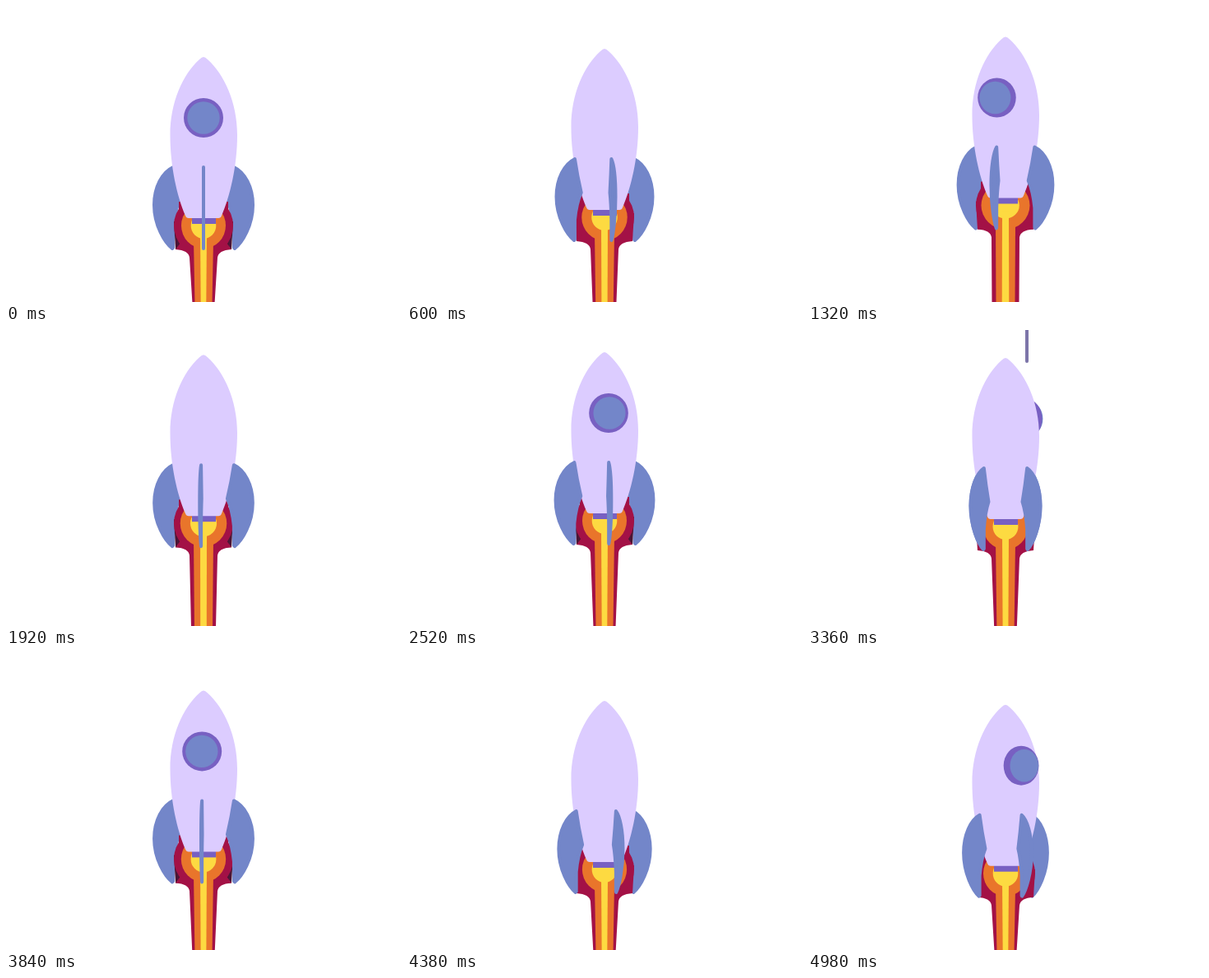
An HTML page with a canvas for the animation above (5.04 s loop, 480x360 px).

```html
<!DOCTYPE html>
<html lang="en">
<head>
<meta charset="utf-8">
<title>Rocket</title>
<style>
  html, body { margin: 0; width: 100%; height: 100%; overflow: hidden; background: #fff; }
  canvas { display: block; }
</style>
</head>
<body>
<canvas id="stage" width="480" height="360"></canvas>
<script>
const ctx = document.getElementById('stage').getContext('2d');
const LOOP = 5040, STEP = 60, CX = 240;
const LILAC = '#dcccff', BLUE = '#7386c9', PURPLE = '#7860c2', STREAK = '#7d75a9';
const RED = '#a31146', ORANGE = '#e9752b', YELLOW = '#fdda41', SHADE = '#4a1535';

// Tracks: [time in ms, value]
const spin = [[0, 0], [600, -167], [1320, -377], [2520, -712], [3360, -945], [4380, -1238], [4980, -1408], [5040, -1425]];
const lift = [[0, 0], [600, -10], [1320, -24.5], [1620, -29], [2100, -33.5], [2520, -35], [2760, -34.7],
  [3360, -28], [3780, -19], [4380, -5], [4740, -1.5], [5040, 0]];
const pulse = [[0, 0], [600, .3], [1320, 1], [2520, 0], [3360, .1], [5040, 0]];

// Streaks: [x, time of entry]
const streaks = [[86, 120], [374, 330], [131, 720], [312, 1392], [106, 1750], [401, 1980], [111, 2290],
  [43, 2832], [311, 3072], [266, 3344], [312, 3560], [62, 3912], [360, 4152], [150, 4500], [339, 4700]];

function at(track, t) {
  const i = Math.max(1, track.findIndex(k => k[0] >= t));
  const [t0, a] = track[i - 1], [t1, b] = track[i];
  return a + (b - a) * (t - t0) / (t1 - t0);
}

function ellipse(x, y, rx, ry, color) {
  ctx.fillStyle = color;
  ctx.beginPath();
  ctx.ellipse(x, y, rx, ry, 0, 0, Math.PI * 2);
  ctx.fill();
}

function fill(path, color) {
  ctx.fillStyle = color;
  ctx.fill(new Path2D(path));
}

function drawStreaks(t) {
  ctx.strokeStyle = STREAK;
  ctx.lineWidth = 4;
  ctx.lineCap = 'round';
  for (const [x, start] of streaks) {
    const head = (t - start) * 2.5;
    if (head < 0 || head > 425) continue;
    ctx.beginPath();
    ctx.moveTo(x, head - 58);
    ctx.lineTo(x, head - 2);
    ctx.stroke();
  }
}

function drawFin(angle) {
  ctx.save();
  ctx.translate(CX, 0);
  ctx.scale(Math.sin(angle) || 1e-4, 1);
  ctx.beginPath();
  ctx.moveTo(37, 196);
  ctx.bezierCurveTo(50, 202, 60, 220, 60, 242);
  ctx.bezierCurveTo(60, 267, 47, 288, 38, 295);
  ctx.lineTo(37, 294);
  ctx.lineTo(37, 270);
  ctx.quadraticCurveTo(35, 250, 29, 237);
  ctx.quadraticCurveTo(34, 216, 37, 196);
  ctx.closePath();
  ctx.restore();
  ctx.fillStyle = ctx.strokeStyle = BLUE;
  ctx.lineWidth = 4;
  ctx.lineJoin = 'round';
  ctx.fill();
  ctx.stroke();
}

function drawWindow(angle) {
  const side = Math.sin(angle), face = Math.abs(Math.cos(angle));
  const glass = () => ellipse(CX + 43 * side, 136, 16 * face + 3.7, 19.7, BLUE);
  const back = Math.cos(angle) < 0;
  if (back) glass();
  ellipse(CX + 36 * side, 136, 17 * face + 7, 24, PURPLE);
  if (!back) glass();
}

function tail(top, y, bottom, end, color) {
  fill(`M${CX - top} ${y}H${CX + top}L${CX + bottom} ${end}H${CX - bottom}Z`, color);
}

function drawFlame(p, edgeOn, end) {
  const foot = 13.5 + 3 * p;
  fill('M204 262H276L274 296H206Z', edgeOn ? SHADE : RED);
  ellipse(CX, 267, 36, 37, RED);
  fill('M210 238H270V262H210Z', RED);
  fill(`M212 288L206 296Q222 297 223 306L${CX - foot} ${end}H${CX + foot}L257 306Q258 297 274 296L268 288Z`, RED);
  ellipse(CX, 267, 27 + 2.5 * p, 28 + p, ORANGE);
  tail(12, 285, 10.5 + p, end, ORANGE);
  ellipse(CX, 267, 15.3 + 1.5 * p, 16, YELLOW);
  tail(4, 275, 3.3 + p, end, YELLOW);
}

function draw(t) {
  const angle = at(spin, t) * Math.PI / 180, y = at(lift, t);
  const fins = [0, 1, 2, 3].map(i => angle + i * Math.PI / 2);
  const inFront = a => Math.cos(a) > .02;

  ctx.clearRect(0, 0, 480, 360);
  drawStreaks(t);
  ctx.save();
  ctx.translate(0, y);
  fins.filter(a => !inFront(a)).forEach(drawFin);
  if (Math.cos(angle) < 0) drawWindow(angle);
  drawFlame(at(pulse, t), Math.abs(Math.sin(2 * angle)) < .4, 362 - y);
  fill('M226 256H255V265H226Z', PURPLE);
  fill('M240 62Q242 62 245 65C265 83 281 117 281 157C281 195 272 232 262 255Q261 258 258 258H222' +
    'Q219 258 218 255C208 232 199.5 195 199.5 157C199.5 117 215 83 235 65Q238 62 240 62Z', LILAC);
  if (Math.cos(angle) >= 0) drawWindow(angle);
  fins.filter(inFront).forEach(drawFin);
  ctx.restore();
}

const start = performance.now();
function frame() {
  const t = (performance.now() - start) % LOOP;
  draw(Math.floor(t / STEP) * STEP);
  requestAnimationFrame(frame);
}
frame();
</script>
</body>
</html>
```
